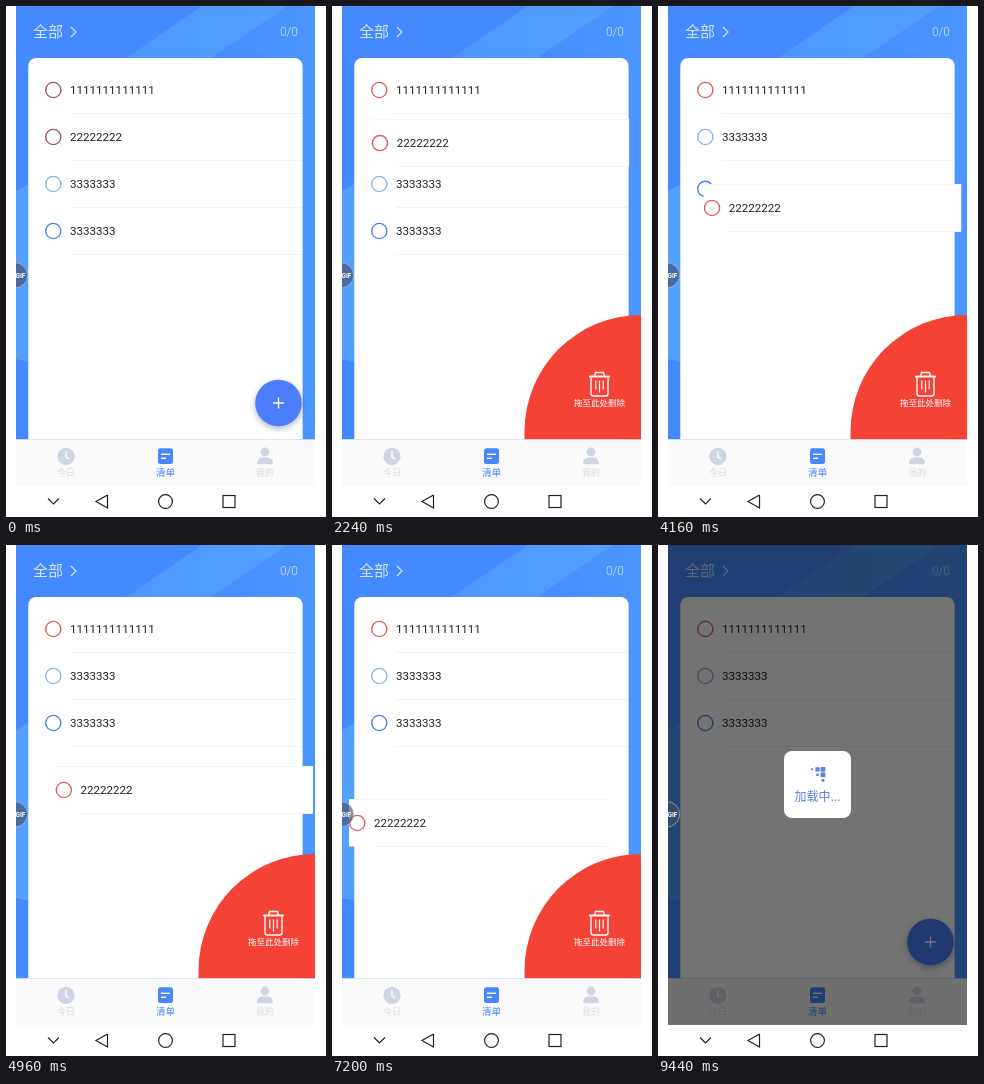
An HTML page with a canvas for the animation above (9600 ms loop, 320 by 511 pixels).

```html
<!DOCTYPE html>
<html lang="zh-CN">
<head>
<meta charset="utf-8">
<title>清单</title>
<style>
html, body { margin: 0; width: 100%; height: 100%; overflow: hidden; background: #fff; }
canvas { display: block; width: 320px; height: 511px; }
</style>
</head>
<body>
<canvas id="stage"></canvas>
<script>
const W = 320, H = 511, LOOP = 9600, STEP = 160;
const LEFT = 10, RIGHT = 309, WIDTH = RIGHT - LEFT;
const TOP = 52, BAR = 433.5, NAV = 480, ROW = 47, FIRST = 84;
const LATIN = 'Roboto, "Noto Sans", sans-serif';
const CJK = '"Noto Sans CJK SC", "Noto Sans CJK", sans-serif';
const BLUE = '#4787fa', BASE = '#4489ff', LIGHT = '#53a0ff';
const IDLE = '#d0d5e5', INK = '#222';

const canvas = document.getElementById('stage');
const ctx = canvas.getContext('2d');
const ratio = window.devicePixelRatio || 1;
canvas.width = W * ratio;
canvas.height = H * ratio;

// Where the finger turns while dragging
const turns = [
  { t: 1760, x: 0, y: 0 },
  { t: 3360, x: 3, y: 28 },
  { t: 4960, x: 10.5, y: 114 },
  { t: 7200, x: -22, y: 147 },
  { t: 8320, x: -8, y: 232 }
];

const mix = (a, b, k) => a + (b - a) * k;
function ease(v, from, to) {
  const k = Math.max(0, Math.min(1, (v - from) / (to - from)));
  return k * k * (3 - 2 * k);
}
function dragAt(t) {
  const pos = { x: 0, y: 0 };
  for (let i = 1; i < turns.length; i++) {
    const a = turns[i - 1], b = turns[i], k = ease(t, a.t, b.t);
    pos.x += (b.x - a.x) * k;
    pos.y += (b.y - a.y) * k;
  }
  return pos;
}

function rect(x, y, w, h, color) {
  ctx.fillStyle = color;
  ctx.fillRect(x, y, w, h);
}
function round(x, y, w, h, r, color) {
  ctx.fillStyle = color;
  ctx.beginPath();
  ctx.roundRect(x, y, w, h, r);
  ctx.fill();
}
function disc(x, y, r, color) {
  ctx.fillStyle = color;
  ctx.beginPath();
  ctx.arc(x, y, r, 0, 7);
  ctx.fill();
}
function ring(x, y, r, color, width) {
  ctx.strokeStyle = color;
  ctx.lineWidth = width;
  ctx.beginPath();
  ctx.arc(x, y, r, 0, 7);
  ctx.stroke();
}
function line(color, width, ...points) {
  ctx.beginPath();
  for (let i = 0; i < points.length; i += 2) ctx.lineTo(points[i], points[i + 1]);
  ctx.strokeStyle = color;
  ctx.lineWidth = width;
  ctx.stroke();
}
function chevron(x, y, dx, dy, color) {
  line(color, 1.2, x - dx - dy, y - dy - dx, x, y, x - dx + dy, y - dy + dx);
}
function text(str, x, y, font, color, align = 'left') {
  ctx.font = font;
  ctx.fillStyle = color;
  ctx.textAlign = align;
  ctx.fillText(str, x, y);
}
function clipTo(x, y, w, h) {
  ctx.save();
  ctx.beginPath();
  ctx.rect(x, y, w, h);
  ctx.clip();
}
function fade(x0, x1, from, to) {
  const g = ctx.createLinearGradient(x0, 0, x1, 0);
  g.addColorStop(0, from);
  g.addColorStop(1, to);
  return g;
}

// Everything right of a slanted edge that meets the card top at x
function slope(x, color) {
  ctx.fillStyle = color;
  ctx.beginPath();
  ctx.moveTo(x, TOP);
  ctx.lineTo(x + 76, 0);
  ctx.lineTo(RIGHT, 0);
  ctx.lineTo(RIGHT, TOP);
  ctx.fill();
}

function backdrop() {
  rect(LEFT, 0, WIDTH, BAR, BASE);
  slope(120, fade(130, 280, '#4c98ff', LIGHT));
  slope(205, fade(205, RIGHT, '#468dff', '#4a95ff'));
  rect(290, TOP, RIGHT - 290, BAR - TOP, '#4a95ff');
  ctx.fillStyle = LIGHT;
  ctx.beginPath();
  ctx.moveTo(LEFT, 185);
  ctx.lineTo(24, 177);
  ctx.lineTo(24, 356);
  ctx.lineTo(LEFT, 353);
  ctx.fill();
}

function header() {
  const c = 'rgba(255,255,255,.78)';
  text('全部', 27, 31.3, '300 15px ' + CJK, c);
  chevron(70, 26, 5, 0, c);
  text('0/0', 292, 30, '300 12px ' + LATIN, c, 'right');
}

function row(label, color, dx, y) {
  ring(47.3 + dx, y, 7.6, color, 1.4);
  text(label, 64 + dx, y + 4.2, '11.6px ' + LATIN, INK);
  rect(64 + dx, y + 23, 232, 1, '#f3f3f3');
}

function list(t) {
  round(22.3, TOP, 274.3, BAR - TOP, [8, 8, 0, 0], '#fff');
  const red = t < 800 ? '#98586a' : '#d9605e';
  const drag = dragAt(t);
  row('1111111111111', red, 0, FIRST);
  // Lower rows move up one slot as the dragged row passes them
  ['#8fb0e2', '#4a80e6'].forEach((color, i) => {
    const pass = 12 + i * ROW;
    row('3333333', color, 0, FIRST + ROW * (i + 2 - ease(drag.y, pass, pass + 15)));
  });
  if (t >= 8640) return;
  const y = FIRST + ROW + drag.y;
  if (drag.y > 0) {
    rect(39 + drag.x, y - 23.5, 257.5, ROW, '#fff');
    rect(39 + drag.x, y - 24, 257.5, 1, '#faf5f5');
  }
  row('22222222', red, drag.x, y);
}

function addButton() {
  const x = 272.5, y = 397, arm = 5.5;
  ctx.save();
  ctx.shadowColor = 'rgba(30,50,110,.35)';
  ctx.shadowBlur = 6 * ratio;
  ctx.shadowOffsetY = 2.5 * ratio;
  disc(x, y, 23.3, '#4c7dfc');
  ctx.restore();
  line('#fff', 1.4, x - arm, y, x + arm, y);
  line('#fff', 1.4, x, y - arm, x, y + arm);
}

function trash() {
  const x = 267.5, y = 370.5, c = '#fff';
  line(c, 1.4, x - 10.5, y, x + 10.5, y);
  line(c, 1.3, x - 5, y, x - 4, y - 4, x + 4, y - 4, x + 5, y);
  ctx.lineWidth = 1.4;
  ctx.beginPath();
  ctx.roundRect(x - 8.5, y, 17, 19.5, [0, 0, 2.5, 2.5]);
  ctx.stroke();
  for (let i = -1; i <= 1; i++) line(c, 1.2, x + i * 3.7, y + 4, x + i * 3.7, y + 16 - Math.abs(i) * 3);
  text('拖至此处删除', x, 399.6, '8.5px ' + CJK, c, 'center');
}

function deleteZone(t) {
  const shown = ease(t, 740, 1100) - ease(t, 8640, 9000);
  if (shown <= 0) return;
  const r = 116.5, y = 425.5;
  ctx.save();
  ctx.translate(0, 126 * (1 - shown));
  ctx.fillStyle = '#f44336';
  ctx.beginPath();
  ctx.moveTo(RIGHT, BAR);
  ctx.lineTo(RIGHT - r, BAR);
  ctx.arc(RIGHT, y, r, Math.PI, Math.PI * 1.5);
  ctx.fill();
  trash();
  ctx.restore();
}

function tabs() {
  const y = 450.3;
  rect(LEFT, BAR, WIDTH, NAV - BAR, '#fafafa');
  disc(60, y, 8.6, IDLE);
  line('#fff', 1.4, 60, y - 5, 60, y + 0.7, 63.5, y + 2.7);
  round(152, y - 8, 15, 15.7, 2.5, BLUE);
  line('#fff', 1.4, 155, y - 2, 164, y - 2);
  line('#fff', 1.4, 155, y + 2, 160, y + 2);
  disc(259, y - 4.3, 4.4, IDLE);
  round(251, y + 1, 16, 7, [6, 6, 1.5, 1.5], IDLE);
  ['今日', '清单', '我的'].forEach((label, i) => {
    const active = i === 1;
    text(label, 60 + i * 99.5, 469.5, (active ? 9.6 : 9) + 'px ' + CJK, active ? BLUE : '#dcdce1', 'center');
  });
}

function systemBar() {
  const y = 495.5;
  rect(LEFT, NAV, WIDTH, H - NAV, '#fff');
  chevron(47.5, y + 2.5, 0, 5.5, INK);
  line(INK, 1.2, 101.5, y - 6.5, 90, y, 101.5, y + 6.5, 101.5, y - 6.5);
  ring(159.5, y, 6.9, INK, 1.2);
  ctx.strokeRect(217, y - 6, 12, 12);
}

function loading(t) {
  const k = ease(t, 8840, 9180);
  if (k <= 0) return;
  rect(LEFT, 0, WIDTH, NAV, `rgba(0,0,0,${0.55 * k})`);
  ctx.globalAlpha = k;
  round(126, 206, 67, 67, 8, '#fff');
  for (let i = 0; i < 9; i++) {
    const col = i % 3, level = Math.floor(i / 3);
    const phase = (t - 9440) / 1300 + (col - level - 1.5) * 0.17;
    const size = 2.5 + 2.1 * Math.cos(phase * 2 * Math.PI) + (col - 1) * 0.4;
    if (size > 0) round(154 + col * 5.5 - size / 2, 224.3 + level * 5.5 - size / 2, size, size, 0.5, '#5b82e2');
  }
  text('加载中...', 159.5, 255.5, '300 12px ' + CJK, '#5b82e2', 'center');
  ctx.globalAlpha = 1;
}

function badge() {
  const x = 9, y = 269.3;
  disc(x, y, 12.8, 'rgba(66,76,100,.62)');
  ring(x, y, 12.6, 'rgba(255,255,255,.5)', 0.8);
  text('GIF', x + 0.5, y + 2.7, 'bold 6.5px ' + LATIN, '#fff');
}

function draw(t) {
  ctx.setTransform(ratio, 0, 0, ratio, 0, 0);
  rect(0, 0, W, H, '#fff');
  clipTo(LEFT, 0, WIDTH, H);
  backdrop();
  header();
  clipTo(LEFT, 0, WIDTH, BAR);
  list(t);
  addButton();
  deleteZone(t);
  ctx.restore();
  tabs();
  loading(t);
  systemBar();
  badge();
  ctx.restore();
}

const start = performance.now();
function tick() {
  const t = (performance.now() - start) % LOOP;
  draw(Math.floor(t / STEP) * STEP);
  requestAnimationFrame(tick);
}
tick();
</script>
</body>
</html>
```
